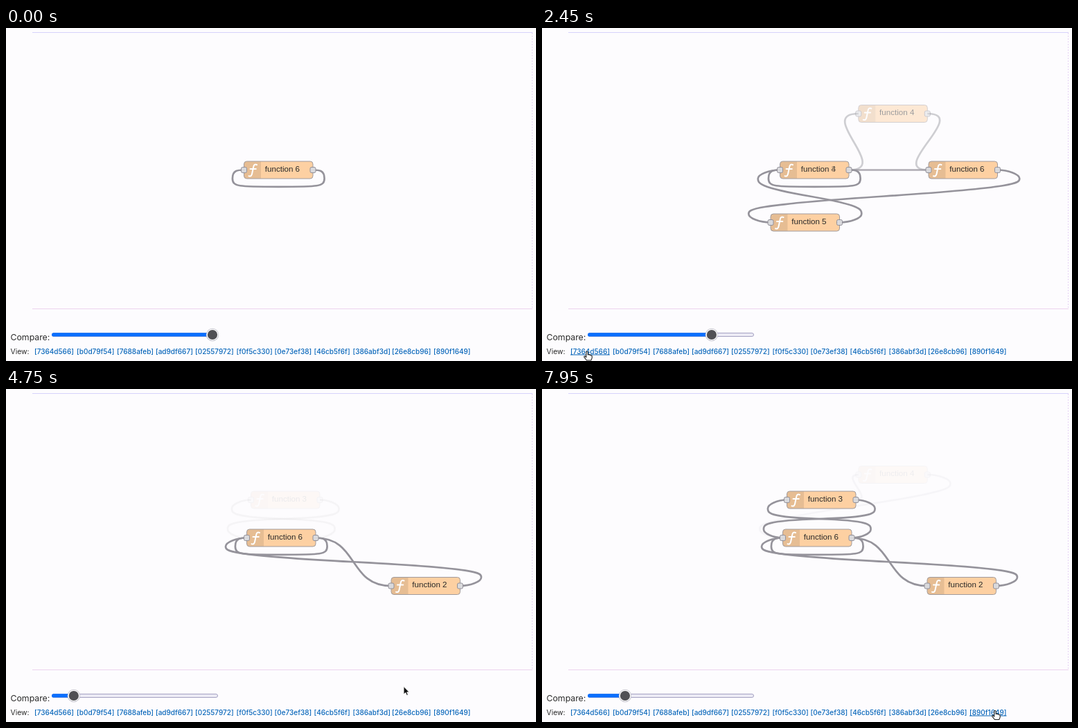
An HTML page that plays this animation: 765x482 px, repeating every 8 s.

```html
<!DOCTYPE html>
<html lang="en">
<head>
<meta charset="utf-8">
<title>Flow revisions</title>
<style>
  html, body { margin: 0; width: 100%; height: 100%; overflow: hidden; background: #fdfcfe; }
  svg { display: block; }
  .wire { fill: none; stroke: #95939b; stroke-width: 2.7; }
  .body { fill: #fdd0a2; stroke: #a09a9c; }
  .port { fill: #d9d9dc; stroke: #918f98; }
  .glyph { fill: none; stroke: #fff; stroke-width: 2; stroke-linecap: round; }
  .label { font: 11.6px "Liberation Sans", Arial, sans-serif; fill: #282828; }
  .ui { font-family: Inter, sans-serif; fill: #2b2b2b; }
  .link { font: 500 10px Inter, sans-serif; fill: #0866ba; }
</style>
</head>
<body>
<svg id="stage" width="765" height="482" viewBox="0 0 765 482">
  <path d="M38 6.5H760" stroke="#d6d2fb"/>
  <path d="M38 406.5H760" stroke="#ecd3ee"/>
  <path d="M759.5 7V406" stroke="#e6d3f4" stroke-dasharray="2 2"/>
  <g id="wires"></g>
  <g id="nodes"></g>
  <text class="ui" x="6.5" y="452" font-size="12.3">Compare:</text>
  <text class="ui" x="6.5" y="471.5" font-size="10.4">View:</text>
  <g id="links"></g>
  <rect x="66.5" y="441.6" width="239" height="4.8" rx="2.4" fill="#eeedf6" stroke="#a09dc0"/>
  <rect id="fill" x="66" y="441.2" height="5.4" rx="2.7" fill="#0a6fff"/>
  <g id="knob">
    <circle r="9.2" fill="#c6c5ce"/>
    <circle r="8.3" fill="#fff"/>
    <circle r="7.1" fill="#505054"/>
  </g>
  <path id="arrow" d="M0 0V11.5L2.7 9.1L4.5 13L6.4 12.1L4.7 8.4H8.2Z" fill="#111" stroke="#fff" stroke-width=".9"/>
  <path id="hand" d="M-1.2 .8Q0 -.9 1.2 .8V5L2.6 4.6Q3.8 4.5 4 5.5Q5.2 5 5.8 6Q7.2 5.8 7.2 7.4V9.6L5.8 13H-.6L-4.2 8.3Q-4.4 6.8 -3 7L-1.2 8.6Z"
    fill="#fff" stroke="#222" stroke-width="1.1" stroke-linejoin="round"/>
</svg>
<script>
const LOOP = 8000, SWEEP = 4950, LAST = 10;
const NODE_W = 99.5, NODE_H = 25, REACH = 83, HALF = NODE_H / 2;

const $ = id => document.getElementById(id);
const clamp = v => Math.min(1, Math.max(0, v));
const ease = v => (1 - Math.cos(Math.PI * clamp(v))) / 2;

function add(parent, tag, attrs, text = '') {
  const el = document.createElementNS('http://www.w3.org/2000/svg', tag);
  for (const key in attrs) el.setAttribute(key, attrs[key]);
  el.textContent = text;
  return parent.appendChild(el);
}

// Input port position of each node, and the first and last revision holding it.
const nodes = {
  old:  { x: 347.5, y: 215.5, from: 0, to: 4, name: 'function 6' },
  main: { x: 343.5, y: 205.5, from: 5, to: 10 },
  n2:   { x: 556, y: 285, from: 1, to: 5, name: 'function 2' },
  n3:   { x: 353.5, y: 160.5, from: 2, to: 6, name: 'function 3' },
  n4:   { x: 456.8, y: 124, from: 3, to: 7, name: 'function 4' },
  n5:   { x: 330, y: 281.5, from: 4, to: 8, name: 'function 5' },
  n6:   { x: 558, y: 205.5, from: 4, to: 9, name: 'function 6' }
};

const wires = [
  ['old', 'old', 0, 4], ['old', 'n2', 1, 4], ['n2', 'old', 1, 4],
  ['old', 'n3', 2, 4], ['n3', 'old', 2, 2], ['n4', 'old', 3, 3], ['old', 'n6', 4, 4],
  ['n3', 'n4', 3, 6], ['n4', 'n6', 4, 7], ['n6', 'n5', 4, 8], ['n5', 'n2', 4, 5],
  ['n2', 'main', 5, 5], ['main', 'n3', 5, 6], ['n5', 'main', 6, 8], ['main', 'n4', 7, 7],
  ['main', 'n6', 8, 9], ['n6', 'main', 9, 9], ['main', 'main', 6, 10]
];

function wirePath(x, y, endX, endY) {
  const dx = endX - x, dy = endY - y, dist = Math.hypot(dx, dy);
  if (dx > 0) {
    const bend = 0.75 * Math.min(REACH, dist);
    return `M${x} ${y}C${x + bend} ${y} ${endX - bend} ${endY} ${endX} ${endY}`;
  }
  const bend = 0.2 * (REACH + Math.min(Math.abs(dx), Math.abs(dy), REACH));
  const down = dy > 0, rise = down ? HALF : -HALF;
  const nearer = down ? Math.min : Math.max, farther = down ? Math.max : Math.min;
  const midX = (x + endX) / 2;
  const midY = Math.abs(dy) < 8 ? Math.max(y, endY) + 24.3 : (y + endY) / 2;
  const quarter = (endY + midY) / 2;
  const topX = x + bend, topY = nearer(quarter - dy / 2, y + rise);
  const botX = endX - bend, botY = farther(quarter, endY - rise);
  const a = [topX, farther(y, topY - rise)];
  const b = [x + bend / 2, nearer(midY, topY + rise)];
  const c = [botX, farther(midY, botY - rise)];
  if (b[1] === topY + rise) {
    a[1] = topY - rise / 2;
    c[1] = botY - rise / 2;
    b[0] = topX;
  }
  return `M${x} ${y}C${x + bend / 2} ${y} ${a} ${topX} ${topY}S${b} ${midX} ${midY}` +
    `S${c} ${botX} ${botY}S${endX - bend / 2} ${endY} ${endX} ${endY}`;
}

const fading = [];
const fade = (el, from, to) => fading.push({ el, from, to });

for (const [a, b, from, to] of wires) {
  const start = nodes[a], end = nodes[b];
  const d = wirePath(start.x + NODE_W, start.y, end.x, end.y);
  fade(add($('wires'), 'path', { class: 'wire', d }), from, to);
}

function addLabel(parent, name) {
  return add(parent, 'text', { class: 'label', x: 30.3, y: 2.3 }, name);
}

for (const { x, y, from, to, name } of Object.values(nodes)) {
  const g = add($('nodes'), 'g', { transform: `translate(${x} ${y})` });
  add(g, 'rect', { class: 'body', y: -HALF, width: NODE_W, height: NODE_H, rx: 4 });
  add(g, 'path', { d: 'M24.5 -12V12H4Q.5 12 .5 8V-8Q.5 -12 4 -12Z', fill: '#000', opacity: 0.09 });
  add(g, 'path', { class: 'glyph', d: 'M18.5 -7.5Q14.5 -9.3 13.7 -4.5L11.6 5.5Q10.7 10 7 8.8M9 -1.5H17.3' });
  for (const px of [0, NODE_W])
    add(g, 'rect', { class: 'port', x: px - 4, y: -4, width: 8, height: 8, rx: 2 });
  if (name) addLabel(g, name);
  else for (let rev = from; rev <= to; rev++)
    fade(addLabel(g, `function ${rev - 4}`), rev === from ? 0 : rev, rev);
  fade(g, from, to);
}

const hashes = '7364d566 b0d79f54 7688afeb ad9df667 02557972 f0f5c330 0e73ef38 46cb5f6f 386abf3d 26e8cb96 890f1649'.split(' ');
const linkX = [41, 102, 160, 216, 273, 332.5, 387.5, 444.5, 500.5, 557, 617, 675];
const links = hashes.map((hash, i) =>
  add($('links'), 'text', { class: 'link', x: linkX[i], y: 471.5 }, `[${hash}]`));

// Pointer stops: time, x, y.
const stops = [
  [150, 40, 492], [650, 65, 468], [4200, 65, 468], [4680, 574, 430.5],
  [6020, 574, 430.5], [6350, 654, 465.5], [LOOP, 654, 465.5]
];

function pointerAt(t) {
  const i = Math.max(1, stops.findIndex(stop => t <= stop[0]));
  const [t0, x0, y0] = stops[i - 1], [t1, x1, y1] = stops[i];
  const k = ease((t - t0) / (t1 - t0));
  return [x0 + (x1 - x0) * k, y0 + (y1 - y0) * k];
}

function draw(t) {
  const value = 1 - ease((t - 848) / SWEEP) + ease((t - 6470) / SWEEP);
  const revision = value * LAST, knobX = 74 + 224 * value;

  // Parts reach full strength slightly before their revision is reached.
  for (const { el, from, to } of fading)
    el.setAttribute('opacity', clamp(1.2 * Math.min(revision - from + 1, to + 1 - revision)));
  $('fill').setAttribute('width', knobX - 66);
  $('knob').setAttribute('transform', `translate(${knobX} 444)`);

  const [x, y] = pointerAt(t), shown = t >= 150;
  const onRow = shown && y > 462 && y < 475;
  const hovered = onRow ? links.findIndex((_, i) => x >= linkX[i] && x < linkX[i + 1] - 3) : -1;
  links.forEach((el, i) => el.setAttribute('text-decoration', i === hovered ? 'underline' : 'none'));
  for (const id of ['arrow', 'hand']) {
    const active = shown && (id === 'hand') === (hovered >= 0);
    $(id).setAttribute('visibility', active ? 'visible' : 'hidden');
    $(id).setAttribute('transform', `translate(${x} ${y})`);
  }
}

const began = performance.now();
function tick() {
  draw((performance.now() - began) % LOOP);
  requestAnimationFrame(tick);
}
tick();
</script>
</body>
</html>
```
